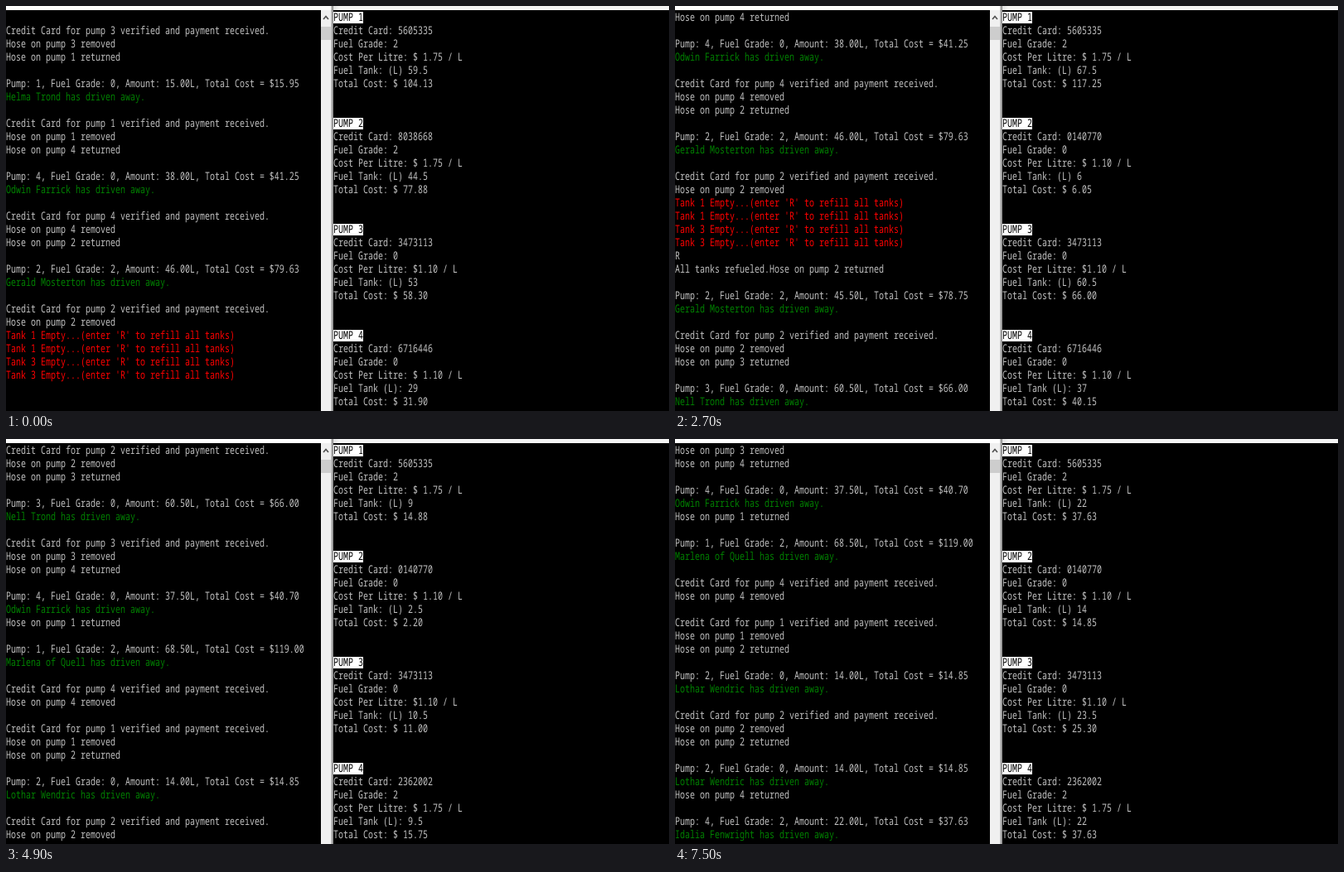
Write an HTML page that moves like this. It is 800 px wide and 489 px high and loops after 7.6 s.

```html
<!DOCTYPE html>
<html lang="en">
<head>
<meta charset="utf-8">
<title>Pump monitor</title>
<style>
html, body { margin: 0; width: 100%; height: 100%; overflow: hidden; background: #000; }
#stage { position: relative; width: 800px; height: 489px; overflow: hidden; background: #000; }
#stage > * { position: absolute; }
pre {
  top: 5px; margin: 0; color: #c0c0c0;
  font: 13.3333px/16px "Noto Sans Mono", "DejaVu Sans Mono", monospace;
  text-rendering: geometricPrecision;
  transform: scaleX(.75); transform-origin: 0 0;
}
#log { left: 0; }
#pumps { left: 395px; }
.gone { color: #008000; }
.empty { color: #f00; }
.head { color: #000; background: linear-gradient(#fff, #fff) 0 3px / 100% 14px no-repeat; }
.top { left: 0; top: 0; width: 800px; height: 5px; background: linear-gradient(90deg, #fff 392px, #ddd 394px, #f4f4f4 402px); }
.bar { left: 380px; top: 5px; width: 12px; height: 484px; background: #f0f0f0; }
.thumb { left: 380px; top: 25px; width: 12px; height: 16px; background: #cdcdcd; }
.edge { left: 392px; top: 0; width: 3px; height: 489px; background: linear-gradient(90deg, #d0d0d0, #808080); }
svg { left: 380px; top: 8px; }
</style>
</head>
<body>
<div id="stage">
  <pre id="log"></pre>
  <pre id="pumps"></pre>
  <div class="top"></div>
  <div class="bar"></div>
  <div class="thumb"></div>
  <div class="edge"></div>
  <svg width="12" height="12"><path d="M3 8 6 4.5 9 8" fill="none" stroke="#505050" stroke-width="1.6"/></svg>
</div>
<script>
const STEP = 100, STEPS = 76, ROWS = 30;
const RATE = [1.10, 2.00, 1.75];

const paid = p =>
  `\n\nCredit Card for pump ${p} verified and payment received.\nHose on pump ${p} removed`;

// The billed cost trails the tank by half a litre.
const left = (p, grade, litres, name) =>
  `\nHose on pump ${p} returned\n\nPump: ${p}, Fuel Grade: ${grade}, Amount: ${litres.toFixed(2)}L, ` +
  `Total Cost = $${((litres - .5) * RATE[grade]).toFixed(2)}\n${name} has driven away.`;

const empty = n => `\nTank ${n} Empty...(enter 'R' to refill all tanks)`;

// [step, text added to the log]
const events = [
  [0, paid(3) + left(1, 0, 15, "Helma Trond") +
      paid(1) + left(4, 0, 38, "Odwin Farrick") +
      paid(4) + left(2, 2, 46, "Gerald Mosterton") +
      paid(2) + empty(1) + empty(1) + empty(3) + empty(3)],
  [5, "\nR"],
  [10, "\nAll tanks refueled."],
  [14, left(2, 2, 45.5, "Gerald Mosterton").trimStart()],
  [15, paid(2)],
  [27, left(3, 0, 60.5, "Nell Trond")],
  [28, paid(3)],
  [29, left(4, 0, 37.5, "Odwin Farrick")],
  [30, left(1, 2, 68.5, "Marlena of Quell") + paid(4)],
  [31, paid(1)],
  [43, left(2, 0, 14, "Lothar Wendric")],
  [44, paid(2)],
  [73, left(2, 0, 14, "Lothar Wendric")],
  [75, left(4, 2, 22, "Idalia Fenwright")]
];

// Per pump, one fill per customer: [first step, litres at start, litres at end, grade, card]
const fills = [
  [[11, 59.5, 68.5, 2, "5605335"], [31, 0, 99, 2, "5605335"]],
  [[11, 44.5, 45.5, 2, "8038668"], [15, 0, 14, 0, "0140770"], [44, 0, 14, 0, "0140770"]],
  [[11, 53, 60.5, 0, "3473113"], [28, 0, 99, 0, "3473113"]],
  [[11, 29, 37.5, 0, "6716446"], [30, 0, 22, 2, "2362002"]]
];

function paint(line) {
  const kind = line.endsWith("away.") ? "gone" : line.startsWith("Tank") ? "empty" : "";
  return kind ? `<span class="${kind}">${line}</span>` : line;
}

function logText(step) {
  let text = events.filter(e => e[0] <= step).map(e => e[1]).join("");
  if (step >= 5 && step < 10) text += "_";
  const lines = text.split("\n").slice(1);
  return lines.slice(Math.max(0, lines.length - ROWS)).map(paint).join("\n");
}

function pumpText(list, i, step) {
  const [start, from, to, grade, card] = list.filter((f, n) => !n || f[0] <= step).pop();
  const tank = Math.min(to, from + Math.max(0, step - start) / 2);
  const fresh = from === 0 && step === start;
  const price = RATE[fresh ? 1 : grade].toFixed(2);
  const cost = Math.max(from, tank - .5) * RATE[grade];
  return [
    `<span class="head">PUMP ${i + 1}</span>`,
    `Credit Card: ${card}`,
    `Fuel Grade: ${grade}`,
    `Cost Per Litre: $${i === 2 ? "" : " "}${price} / L`,
    `Fuel Tank${i === 3 ? " (L):" : ": (L)"} ${tank}`,
    `Total Cost: $ ${cost.toFixed(2)}`
  ].join("\n");
}

const logBox = document.getElementById("log");
const pumpBox = document.getElementById("pumps");
const begin = performance.now();
let shown = -1;

function draw() {
  const step = Math.floor((performance.now() - begin) / STEP) % STEPS;
  if (step !== shown) {
    shown = step;
    logBox.innerHTML = logText(step);
    pumpBox.innerHTML = fills.map((f, i) => pumpText(f, i, step)).join("\n\n\n");
  }
  requestAnimationFrame(draw);
}
draw();
</script>
</body>
</html>
```
